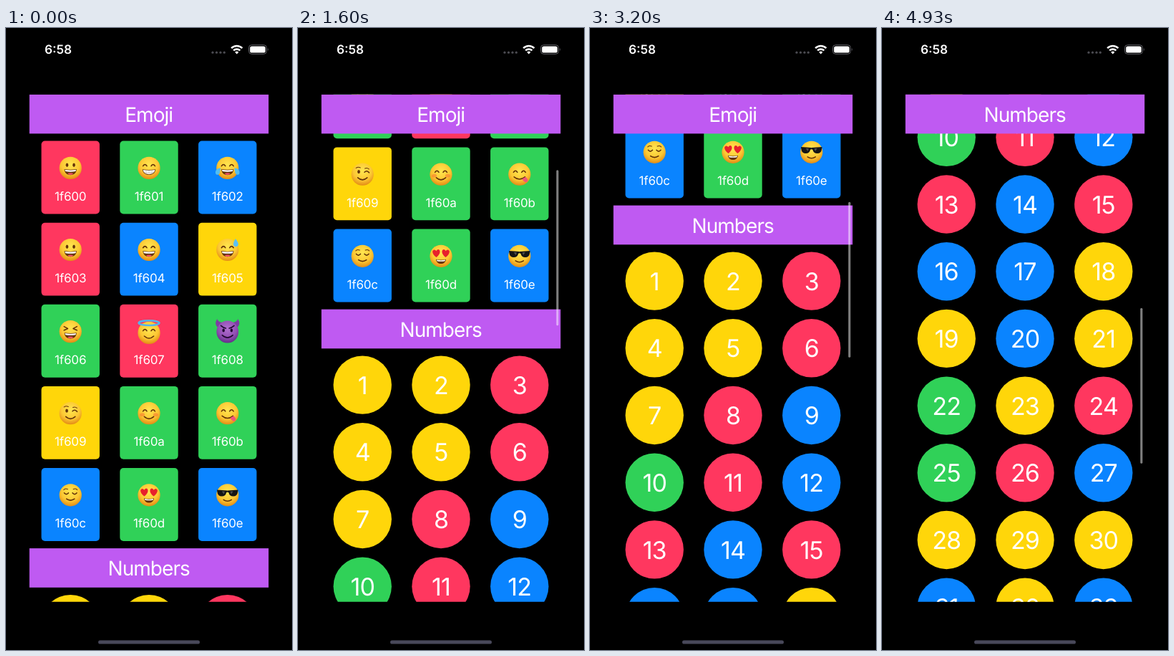
Recreate the animation shown at these times as an HTML page. Size 400 by 868 pixels, loop 4990 ms.

```html
<!DOCTYPE html>
<html lang="en">
<head>
<meta charset="utf-8">
<title>Pinned headers</title>
<style>
  html, body { margin: 0; width: 100%; height: 100%; overflow: hidden; background: #000; }
  svg { display: block; }
  text {
    font-family: Inter, Roboto, sans-serif;
    fill: #fff;
    text-anchor: middle;
    text-rendering: geometricPrecision;
  }
  .title { font-size: 28px; letter-spacing: -.034em; }
  .label { font-size: 17px; letter-spacing: -.01em; }
  .digit { font-size: 34px; letter-spacing: -.025em; }
  .clock { font-size: 17.2px; font-weight: 600; }
</style>
</head>
<body>
<svg id="stage" width="400" height="868" viewBox="0 0 400 868">
  <defs>
    <radialGradient id="skin" cx=".5" cy=".35" r=".68">
      <stop offset="0" stop-color="#ffe650"/>
      <stop offset=".6" stop-color="#fcc733"/>
      <stop offset="1" stop-color="#e08412"/>
    </radialGradient>
    <radialGradient id="imp" cx=".5" cy=".35" r=".68">
      <stop offset="0" stop-color="#b26fd0"/>
      <stop offset=".6" stop-color="#924fb4"/>
      <stop offset="1" stop-color="#602a84"/>
    </radialGradient>
  </defs>

  <text class="clock" x="73" y="36.2">6:58</text>
  <g fill="#4c4c52">
    <circle cx="289" cy="34.2" r="1.6"/><circle cx="294.5" cy="34.2" r="1.6"/>
    <circle cx="300" cy="34.2" r="1.6"/><circle cx="305.3" cy="34.2" r="1.6"/>
    <path d="M366 28q2 1.8 0 4z"/>
  </g>
  <g fill="none" stroke="#fff" stroke-width="2.6">
    <path d="M315.2 28.2a10.8 10.8 0 0 1 15.2 0"/>
    <path d="M318.2 31.4a6.6 6.6 0 0 1 9.2 0"/>
  </g>
  <path d="M320.2 33.7a3.8 3.8 0 0 1 5.2 0L322.8 36.4z" fill="#fff"/>
  <rect x="339.5" y="23.7" width="25" height="12.6" rx="4" fill="none" stroke="#626268"/>
  <rect x="341.2" y="25.4" width="21.6" height="9.2" rx="2.6" fill="#fff"/>
  <rect x="129" y="854.4" width="142" height="5.2" rx="2.6" fill="#48485a"/>

  <svg x="32.5" y="92.7" width="335" height="708.1" overflow="hidden">
    <g id="content"></g>
    <g id="emojiHead"></g>
    <g id="numberHead"></g>
  </svg>
  <rect id="bar" x="361.3" width="3.1" height="217" rx="1.5" fill="#fff" fill-opacity=".5"/>
</svg>

<script>
const LOOP = 4990, STEP = 1000 / 15;
const HEAD = 54.7, NUMBERS_TOP = 633.4;
const COLORS = { r: '#ff375f', g: '#30d158', b: '#0a84ff', y: '#ffd60a' };
const CARDS = 'rgbrbygrgyggbgb';
const DISCS = 'yyryyryrbgrbrbrbbyybygyrgrbyyybyb';
const $ = id => document.getElementById(id);

// Face parts, centred on 0,0 with a radius of 15.6
const INK = '#633208';
const both = part => `${part}<g transform="scale(-1 1)">${part}</g>`;
const line = (d, w = 1.6, color = INK) =>
  `<path d="${d}" fill="none" stroke="${color}" stroke-width="${w}" stroke-linecap="round" stroke-linejoin="round"/>`;
const fill = (d, color) => `<path d="${d}" fill="${color}"/>`;
const oval = (x, y, rx, ry, color = INK) =>
  `<ellipse cx="${x}" cy="${y}" rx="${rx}" ry="${ry}" fill="${color}"/>`;

const head = oval(0, 0, 15.6, 15.6, 'url(#skin)');
const openEyes = both(oval(4.8, -4.2, 1.8, 2.7));
const happyEyes = both(line('M3-2.8Q5.6-7 8.4-2.8'));
const restEyes = both(line('M2.8-3Q5.8 .6 8.8-3') + line('M4-8.2Q7-9.6 9.4-7.4', 1.1));
const blush = both(oval(9.4, 2, 3.4, 2.4, 'rgba(245,95,50,.45)'));
const smile = line('M-6.6 4.6Q0 10.6 6.6 4.6');
const laugh = fill('M-8.6 1.6Q0 3.2 8.6 1.6C8.6 12.6-8.6 12.6-8.6 1.6z', INK)
  + fill('M-7.8 2.3Q0 3.8 7.8 2.3L7.2 4.7Q0 5.8-7.2 4.7z', '#fff')
  + oval(0, 8.2, 3.6, 1.3, '#ee5063');
const grin = fill('M-9.2 1.8Q0 3.2 9.2 1.8C9 12-9 12-9.2 1.8z', INK)
  + fill('M-8.3 2.7Q0 4 8.3 2.7C7.6 10.6-7.6 10.6-8.3 2.7z', '#fff')
  + line('M-7.4 5.8Q0 7 7.4 5.8M-4 3.6V8.6M0 3.8V9M4 3.6V8.6', .5, '#b9aa9a');
const heart = fill('M6.4 1.6C-.6-3.2 1-9.4 4-9.2Q6-9 6.6-7Q8-9.2 10.2-8.6C13.6-7.4 11.4-1.6 6.4 1.6z', '#e8202c');
const tear = fill('M9.6 .2C15 0 18 4.6 16.4 8C14.6 11 10.6 9 10.6 5.4z', '#52bdf2');
const horn = fill('M6-12.4Q12.6-12.6 14.6-17.6Q19.6-9.4 12.6-5z', '#7c3da2');
const shades = both(fill('M0-6.4L14.8-7.2L14.4-4.6Q13.6 1.8 8 1.8Q2.8 1.8 1.6-3.6L0-4z', '#151515')
  + fill('M4-5.4H8L5.4-1.4Q4-3 4-5.4z', '#4b4b4b'));

const FACES = [
  head + openEyes + laugh,
  head + happyEyes + grin,
  head + happyEyes + laugh + both(tear),
  head + openEyes + laugh,
  head + happyEyes + laugh,
  head + happyEyes + laugh + fill('M11.2-15.4Q16.4-8.8 14.8-6Q11.8-2.6 8.4-6Q7.4-9.6 11.2-15.4z', '#5cc0f4'),
  head + both(line('M9-7L3.8-4.2L9-1.8')) + laugh,
  `<g transform="translate(0 1.8)">${head + happyEyes + smile}</g>`
    + '<ellipse cy="-12" rx="14.4" ry="3.4" fill="none" stroke="#55b4ea" stroke-width="2.6"/>',
  both(horn) + oval(0, .4, 15.4, 15.4, 'url(#imp)')
    + both(oval(5.6, -1.6, 1.8, 2.4, '#230a33') + line('M2.4-4.6Q6-5.2 9.2-8.2', 1.7, '#230a33'))
    + line('M-7.4 5Q0 12 7.4 5', 1.7, '#230a33'),
  head + oval(-5.2, -3.6, 1.9, 2.6) + line('M-9-8.8Q-6-11-3-9.2', 1.1)
    + line('M2.8-3Q6-6.2 9.2-2.4') + line('M3.4-8.2Q6.6-9.6 9-7.4', 1.1) + smile,
  head + blush + happyEyes + smile,
  head + happyEyes + line('M-7.6 3.6Q0 10 7.6 3.6')
    + fill('M3.6 6.6L8.6 3.6Q13 7.6 10.8 10.4Q7.4 12.6 3.6 6.6z', '#f0557a'),
  head + restEyes + line('M-5.6 5.4Q0 9.2 5.6 5.4'),
  head + both(heart) + fill('M-7 4.4Q0 6.2 7 4.4C6.6 12.8-6.6 12.8-7 4.4z', INK)
    + fill('M-6.2 5.1Q0 6.6 6.2 5.1L5.6 7Q0 8-5.6 7z', '#fff'),
  head + shades + line('M-5.6 6.6Q0 10.4 5.6 6.6')
];

const text = (kind, x, y, size, words) =>
  `<text class="${kind}" x="${x}" y="${y + size * .3635}">${words}</text>`;
const banner = words =>
  `<rect width="335" height="${HEAD}" fill="#bf5af2"/>` + text('title', 167.2, 27.8, 28, words);
const grid = (colors, top, pitch, cell) => [...colors].map((c, i) =>
  `<g transform="translate(${57.7 + i % 3 * 109.8} ${top + Math.floor(i / 3) * pitch})">${cell(COLORS[c], i)}</g>`
).join('');

$('content').innerHTML =
  grid(CARDS, 64.9, 114.1, (color, i) =>
    `<rect x="-40.7" width="81.4" height="101.9" rx="5" fill="${color}"/>`
    + `<g transform="translate(0 37.8)">${FACES[i]}</g>`
    + text('label', 0, 77, 17, (0x1f600 + i).toString(16)))
  + grid(DISCS, 698.2, 93.7, (color, i) =>
    `<circle cy="40.7" r="40.7" fill="${color}"/>` + text('digit', 0, 41, 34, i + 1));
$('emojiHead').innerHTML = banner('Emoji');
$('numberHead').innerHTML = banner('Numbers');

// Each swipe drags from `down`, then the distance left decays: [time, left]
const SWIPES = [
  { down: 900, from: 0, end: 484,
    left: [[1067, 420], [1200, 326], [1600, 150.5], [2400, 29.5], [3200, 5.5], [3266, 4.8]] },
  { down: 3334, from: 479.2, end: 984.9,
    left: [[3500, 430.7], [4200, 106.2], [4933, 24.5]] }
];

function scrollAt(t) {
  const swipe = SWIPES.filter(s => t >= s.down).pop();
  if (!swipe) return 0;
  const { down, from, end, left } = swipe;
  const [up, first] = left[0];
  if (t < up) return from + (end - first - from) * ((t - down) / (up - down)) ** 2.2;
  const i = left.findIndex(key => key[0] > t);
  if (i < 0) return end - left[left.length - 1][1];
  const [t0, a] = left[i - 1], [t1, b] = left[i];
  return end - a * (b / a) ** ((t - t0) / (t1 - t0));
}

const moveY = (id, y) => $(id).setAttribute('transform', `translate(0 ${y.toFixed(2)})`);

function draw(now) {
  const tick = Math.floor((now % LOOP + 4) / STEP);
  const y = scrollAt(tick * STEP);
  const numbers = Math.max(0, NUMBERS_TOP - y);
  moveY('content', -y);
  moveY('numberHead', numbers);
  moveY('emojiHead', Math.min(0, numbers - HEAD));
  moveY('bar', 95.8 + y * .307);
  $('bar').style.display = y > 0 ? '' : 'none';
}

function loop() {
  draw(performance.now());
  requestAnimationFrame(loop);
}
loop();
</script>
</body>
</html>
```
